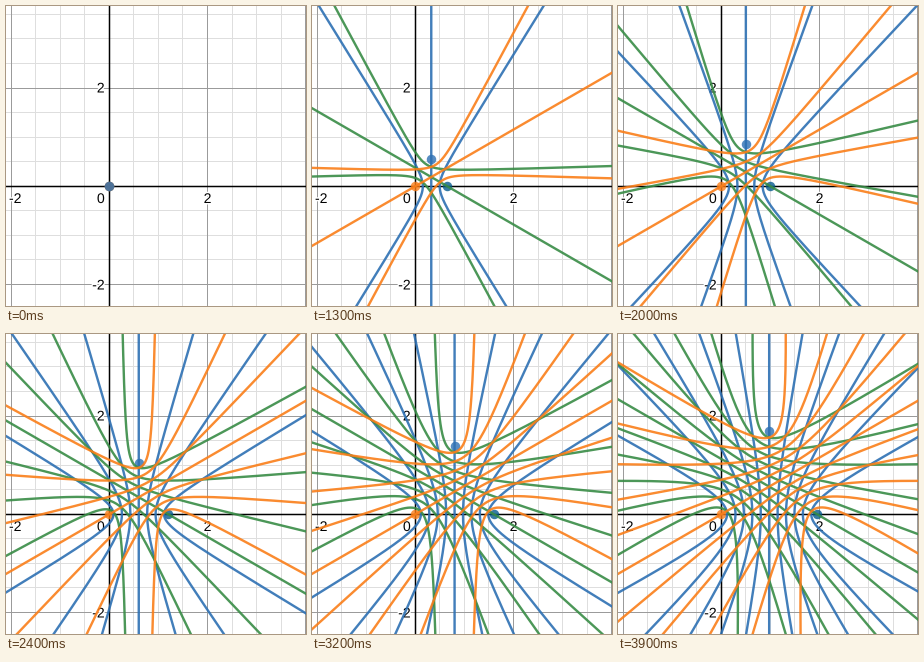
Animation, 300 px wide and 300 px high, one loop 4 s. Source, as a matplotlib script:

```python
import numpy as np
import matplotlib.pyplot as plt
from matplotlib.animation import FuncAnimation
from matplotlib.patheffects import withStroke

SIZE, DPI = 300, 100
FRAMES, INTERVAL = 40, 100
ORIGIN = np.array([103.3, 180.25])  # pixel position of (0, 0)
UNIT = 49.1                         # pixels per unit
WAVELENGTH = 0.343                  # step of the path difference
REACH = 14                          # how far curves extend, in units

BLUE, GREEN, ORANGE = "#2d70b3", "#388c46", "#fa7e19"
DEEP_BLUE = "#055a8d"


def px(width):
    """Convert pixels to points."""
    return width * 72 / DPI


def to_stage(points):
    return ORIGIN + np.asarray(points) * [UNIT, -UNIT]


plt.rcParams["font.family"] = "Liberation Sans"
fig = plt.figure(figsize=(SIZE / DPI, SIZE / DPI), dpi=DPI, facecolor="white")
ax = fig.add_axes([0, 0, 1, 1])
ax.set_xlim(0, SIZE)
ax.set_ylim(SIZE, 0)
ax.axis("off")


def draw_grid():
    for i in range(-6, 9):
        # grid lines sit on pixel centres
        x, y = np.floor(to_stage([i / 2, -i / 2])) + 0.5
        if i == 0:
            style = dict(color="black", lw=px(1.5), zorder=2)
        elif i % 4 == 0:
            style = dict(color="#9b9b9b", lw=px(1), zorder=1)
        else:
            style = dict(color="#dedede", lw=px(1), zorder=0)
        ax.axvline(x, snap=False, **style)
        ax.axhline(y, snap=False, **style)
    top = np.floor(to_stage([0, 3.5]))[1] + 0.5
    ax.axhline(top, snap=False, color="#dedede", lw=px(1), zorder=0)


def label(x, y, text, ha):
    ax.text(x, y, text, ha=ha, va="center_baseline", fontsize=px(14),
            color="black", zorder=3,
            path_effects=[withStroke(linewidth=px(3), foreground="white")])


def hyperbolas(f1, f2):
    """Curves whose distances to both foci differ by whole wavelengths."""
    f1, f2 = np.array(f1), np.array(f2)
    gap = np.hypot(*(f2 - f1))
    if gap == 0:
        return np.full((1, 2), np.nan)
    center = (f1 + f2) / 2
    u = (f2 - f1) / gap
    v = np.array([-u[1], u[0]])
    parts = [center + np.outer([-REACH, REACH], v), [[np.nan] * 2]]
    n = 1
    while n * WAVELENGTH < gap:
        a = n * WAVELENGTH / 2
        b = np.sqrt(gap ** 2 / 4 - a ** 2)
        limit = np.arccosh(REACH / a)
        s = np.linspace(-limit, limit, 241)
        for side in (-1, 1):
            parts.append(center + np.outer(side * a * np.cosh(s), u)
                         + np.outer(b * np.sinh(s), v))
            parts.append([[np.nan] * 2])
        n += 1
    return np.vstack(parts)


draw_grid()
label(98.7, 81, "2", "right")
label(98.7, 278, "-2", "right")
label(98.7, 191.5, "0", "right")
label(201.6, 191.5, "2", "center")
label(3, 191.5, "-2", "left")

dots = [ax.plot([], [], "o", ms=px(9.5), mew=0, color=c, alpha=0.8, zorder=4,
                snap=False)[0]
        for c in (DEEP_BLUE, ORANGE, BLUE)]
curves = [ax.plot([], [], color=c, lw=px(2.4), alpha=0.9, zorder=5 + i,
                  snap=False)[0]
          for i, c in enumerate((BLUE, GREEN, ORANGE))]


def update(frame):
    side = frame / 20
    left, right = (0, 0), (side, 0)
    top = (side / 2, side * np.sqrt(3) / 2)
    for dot, point in zip(dots, (right, left, top)):
        x, y = to_stage(point)
        dot.set_data([x], [y])
    pairs = ((left, right), (left, top), (right, top))
    for curve, foci in zip(curves, pairs):
        curve.set_data(*to_stage(hyperbolas(*foci)).T)
    return dots + curves


anim = FuncAnimation(fig, update, frames=FRAMES, interval=INTERVAL,
                     init_func=lambda: update(0), repeat=True, repeat_delay=0)
plt.show()
```
